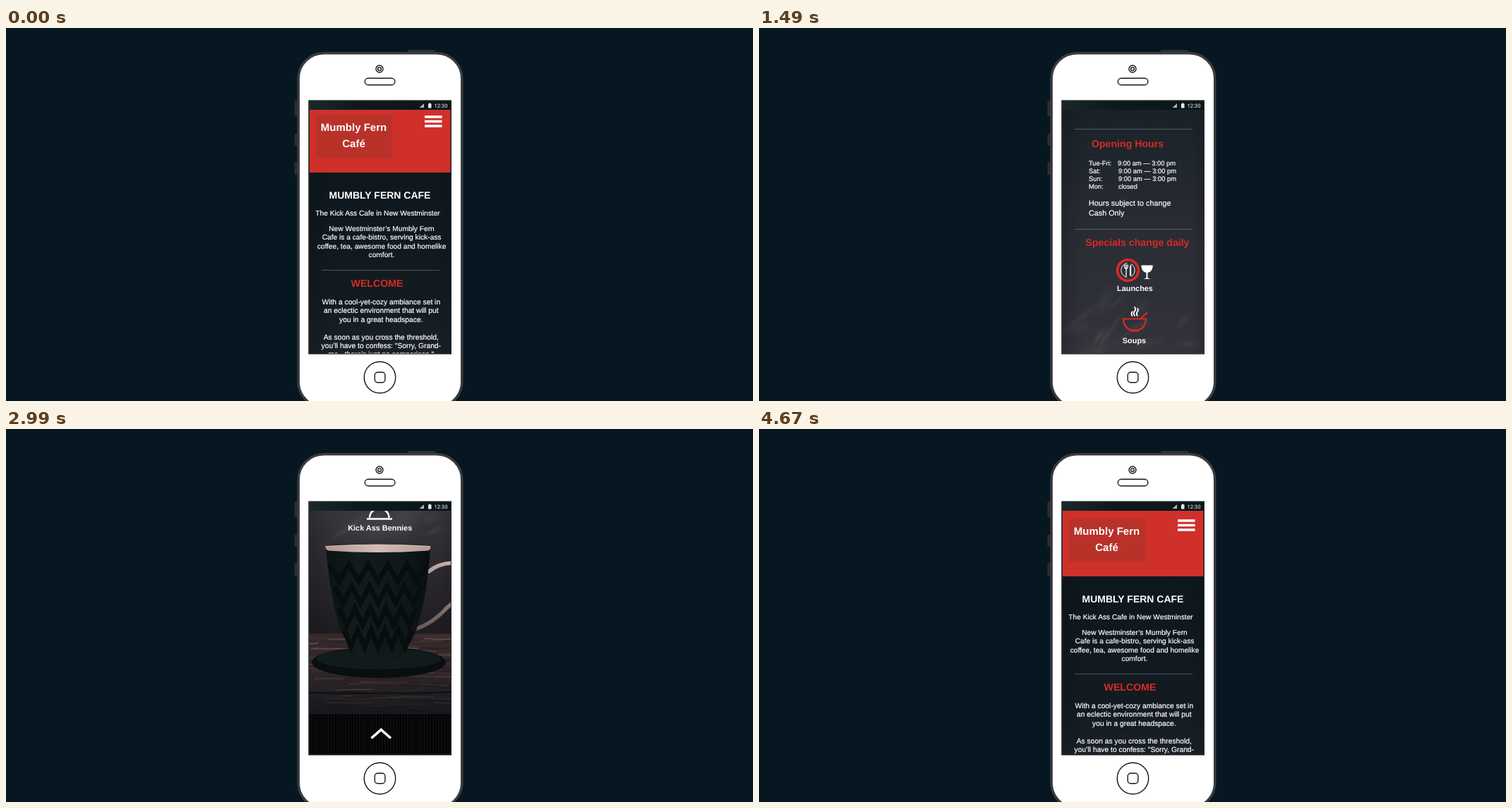
Animation of 1058 by 529 pixels, one loop 4700 ms. Source, as an HTML page:

```html
<!DOCTYPE html>
<html lang="en">
<head>
<meta charset="utf-8">
<title>Cafe mobile page</title>
<style>
  html, body { margin: 0; width: 100%; height: 100%; overflow: hidden; background: #071721; }
  svg { display: block; width: 100vw; height: 100vh; }
  text {
    font-family: "Liberation Sans", Arial, sans-serif;
    font-size: 10.2px; fill: #fff; stroke: #fff; stroke-width: .2px;
    text-rendering: geometricPrecision; white-space: pre;
  }
  .mid text { text-anchor: middle; }
  .title { font-size: 14px; font-weight: bold; stroke: none; }
  .red { font-size: 14.15px; font-weight: bold; fill: #d62b24; stroke: none; }
  .dish text, text.dish { font-size: 10.9px; font-weight: bold; text-anchor: middle; stroke: none; }
  .body text { font-size: 10.3px; }
  .hours text { font-size: 9.35px; }
  .note text { font-size: 10.8px; }
  .foot text { font-size: 9.65px; }
  .menu text { font-size: 9.2px; }
  .logo text { font-size: 15px; font-weight: bold; stroke: none; }
  .rule { stroke: #aab4ba; stroke-opacity: .38; }
  .line { fill: none; stroke: #fff; stroke-width: 1.3; stroke-linecap: round; stroke-linejoin: round; }
  .ink { fill: none; stroke: #15171a; stroke-width: 1.4; }
</style>
</head>
<body>
<svg viewBox="0 0 1058 529" preserveAspectRatio="none">
  <defs>
    <clipPath id="view"><rect x="429.5" y="116" width="200.5" height="345.5"/></clipPath>
    <linearGradient id="board" gradientUnits="userSpaceOnUse" x1="0" y1="100" x2="0" y2="1200">
      <stop offset="0" stop-color="#0b151b"/>
      <stop offset=".26" stop-color="#131b21"/>
      <stop offset=".4" stop-color="#20262d"/>
      <stop offset=".52" stop-color="#2c2e35"/>
      <stop offset=".68" stop-color="#34343b"/>
      <stop offset=".84" stop-color="#353439"/>
      <stop offset=".93" stop-color="#29272c"/>
      <stop offset="1" stop-color="#1d1b20"/>
    </linearGradient>
    <linearGradient id="edge">
      <stop offset="0" stop-color="#05090d" stop-opacity=".2"/>
      <stop offset=".16" stop-color="#05090d" stop-opacity="0"/>
      <stop offset=".9" stop-color="#05090d" stop-opacity="0"/>
      <stop offset="1" stop-color="#05090d" stop-opacity=".15"/>
    </linearGradient>
    <radialGradient id="haze">
      <stop offset="0" stop-color="#a8a4a8" stop-opacity=".14"/>
      <stop offset="1" stop-color="#a8a4a8" stop-opacity="0"/>
    </radialGradient>
    <linearGradient id="china">
      <stop offset="0" stop-color="#0b1314"/>
      <stop offset=".3" stop-color="#111c1d"/>
      <stop offset=".75" stop-color="#0f1819"/>
      <stop offset="1" stop-color="#090f10"/>
    </linearGradient>
    <linearGradient id="rim">
      <stop offset="0" stop-color="#b3968f"/>
      <stop offset=".5" stop-color="#d4beb6"/>
      <stop offset="1" stop-color="#b39993"/>
    </linearGradient>
    <linearGradient id="grip" gradientUnits="userSpaceOnUse" x1="0" y1="385" x2="0" y2="480">
      <stop offset="0" stop-color="#cbb5ae"/>
      <stop offset=".3" stop-color="#a8938e"/>
      <stop offset="1" stop-color="#6b5b59"/>
    </linearGradient>
    <linearGradient id="dusk" x2="0" y2="1">
      <stop offset=".4" stop-color="#10161a" stop-opacity="0"/>
      <stop offset="1" stop-color="#10161a" stop-opacity=".85"/>
    </linearGradient>
    <linearGradient id="status">
      <stop offset="0" stop-color="#1b282a"/>
      <stop offset=".35" stop-color="#0d191d"/>
      <stop offset="1" stop-color="#0b161a"/>
    </linearGradient>
    <pattern id="pin" width="4" height="4" patternUnits="userSpaceOnUse">
      <rect width="4" height="4" fill="#040404"/>
      <rect width="1.4" height="4" fill="#110f0f"/>
    </pattern>
  </defs>

  <rect width="1058" height="529" fill="#071721"/>

  <!-- phone -->
  <g fill="#2b2d30">
    <rect x="408.5" y="103" width="6" height="22" rx="1"/>
    <rect x="408.5" y="150" width="6" height="17" rx="1"/>
    <rect x="408.5" y="190" width="6" height="18" rx="1"/>
    <rect x="569" y="31" width="39" height="6" rx="1"/>
  </g>
  <rect x="414.2" y="35.7" width="231.5" height="502" rx="36" fill="#fff" stroke="#3a3b3e" stroke-width="3.5"/>
  <g class="ink">
    <circle cx="529" cy="58" r="5"/>
    <circle cx="529" cy="58" r="2.4"/>
    <rect x="508.3" y="71.3" width="42.6" height="9.4" rx="4.7"/>
    <circle cx="529.5" cy="495.5" r="22.2"/>
    <rect x="522.3" y="488.3" width="14.6" height="14.4" rx="4"/>
  </g>
  <rect x="428.5" y="102.5" width="202.5" height="360" fill="#1c2429"/>

  <g clip-path="url(#view)">
    <g id="page">
      <rect x="429" y="0" width="202" height="1310" fill="url(#board)"/>
      <g id="smoke" fill="url(#haze)">
        <ellipse cx="575" cy="915" rx="100" ry="95"/>
        <ellipse cx="480" cy="860" rx="70" ry="90" opacity=".5"/>
        <ellipse cx="575" cy="1005" rx="30" ry="62" transform="rotate(24 575 1005)"/>
        <ellipse cx="525" cy="1045" rx="70" ry="34"/>
      </g>
      <rect x="429" y="205" width="202" height="1103" fill="url(#edge)"/>

      <!-- header -->
      <rect x="430" y="0" width="199.5" height="205" fill="#cf302a"/>
      <rect x="438.5" y="123.5" width="108" height="61" fill="#b8322a"/>
      <g class="mid logo">
        <text x="492.5" y="146">Mumbly Fern</text>
        <text x="492.5" y="169">Café</text>
      </g>
      <path d="M593 126h24.5M593 132.5h24.5M593 139h24.5" stroke="#fff" stroke-width="3.5"/>

      <g class="mid">
        <text class="title" x="529.5" y="242">MUMBLY FERN CAFE</text>
        <text x="526.5" y="266">The Kick Ass Cafe in New Westminster</text>
        <text x="532" y="288.2">New Westminster’s Mumbly Fern</text>
        <text x="532" y="300.3">Cafe is a cafe-bistro, serving kick-ass</text>
        <text x="532" y="312.5">coffee, tea, awesome food and homelike</text>
        <text x="532" y="324.7">comfort.</text>
        <text class="red" x="525.5" y="366.7">WELCOME</text>
      </g>
      <path class="rule" d="M447 343.5H614M447 497.5H614M447 639.5H614M447 982.5H614"/>
      <g class="mid body">
        <text x="531.3" y="392">With a cool-yet-cozy ambiance set in</text>
        <text x="531.3" y="404.3">an eclectic environment that will put</text>
        <text x="531.3" y="416.6">you in a great headspace.</text>
        <text x="531.3" y="441.6">As soon as you cross the threshold,</text>
        <text x="531.3" y="454">you’ll have to confess: "Sorry, Grand-</text>
        <text x="531.3" y="466.4">ma - there’s just no comparison."</text>
      </g>
      <g class="mid">
        <text class="red" x="522" y="522.5">Opening Hours</text>
        <text class="red" x="536" y="662.5">Specials change daily</text>
        <text class="red" x="534.5" y="1000.2">Saturday &amp; Sunday</text>
      </g>
      <g class="hours">
        <text x="467" y="548.5">Tue-Fri:</text><text x="508" y="548.5">9:00 am — 3:00 pm</text>
        <text x="467" y="559.8">Sat:</text><text x="509" y="559.8">9:00 am — 3:00 pm</text>
        <text x="467" y="571">Sun:</text><text x="509" y="571">9:00 am — 3:00 pm</text>
        <text x="467" y="582.3">Mon:</text><text x="509" y="582.3">closed</text>
      </g>
      <g class="note">
        <text x="467" y="606">Hours subject to change</text>
        <text x="467" y="619.5">Cash Only</text>
      </g>

      <!-- dishes -->
      <g class="dish" transform="translate(0 521)">
        <circle cx="522.5" cy="176.5" r="14.8" fill="none" stroke="#d62b24" stroke-width="3.6"/>
        <path class="line" style="stroke-width:1" d="M521 166.5a10.2 10.2 0 0 0 0 20M527.5 167.8a10.2 10.2 0 0 1 0 17.4"/>
        <path class="line" d="M517.8 169v4q2.2 3.500 4.400 0v-4M520 169v15.500"/>
        <path d="M525 184.500v-12q0-3 2.200-4.500v16.500z" fill="#fff"/>
        <path d="M541.300 169.500h16.600q-.5 9.500-7.400 10.500v7.500l4 1.500h-10l4-1.500v-7.500q-6.700-1-7.200-10.500z" fill="#fff"/>
        <text x="532.5" y="206">Launches</text>

        <path class="line" style="stroke-width:1.8" d="M528.500 241q-2-3 0-5.500M532 241q-2.500-4 0-6.500t0-5.500M535.800 241q-2-3 0-5.500t.5-4.500"/>
        <path fill="none" stroke="#d62b24" stroke-width="2.2" stroke-linejoin="round" d="M514.500 245.500h34.500M516 246q1 13.500 12 15.500h8q11-2 12-15.500M525.500 262.500h12.500M540.500 245l9.500-8.500"/>
        <text x="531.5" y="280">Soups</text>

        <path fill="#d62b24" d="M518 314.500l3.500-1 .5 1h3l4-2 1.500 9-5 .3-1 1-6-1.300zM538 311h4l1.500 4-1 9h-3z"/>
        <g fill="#fff">
          <path id="strip" d="M526.300 310h4.400l3.600 16h-4.400z"/>
          <use href="#strip" x="5.4"/>
          <path d="M537.300 310h4l2.600 16h-4z"/>
          <path d="M537.500 328.500l5-.8-1.800 6.300h-3z"/>
        </g>
        <path d="M532 312l2.800 13M537 312l2.800 13" stroke="#d62b24" stroke-width=".8"/>
        <text x="531.5" y="347.5">Casseroles</text>
        <text x="531.5" y="360.5">Pastas</text>

        <path class="line" d="M508.500 395.500h8M508.500 399h9M508.500 402.500h8M516.500 395.500q5-1 8 2M516.500 402.500q4 3.500 9.500 0M527 398q-2-8 12.500-10.500 1.500 7-3.500 11M526.500 398.500q-2 8 5.500 10 6 1.500 10.500 1.500 1-5-1.500-10.500-3-7.500-7-5.500t-7.500 4.500M529 400l12 8.500M528 397.500l9-7M534 397v6l-4 1.500M538 400v6"/>
        <text x="531.5" y="423">Vegetarian</text>
        <text x="531.5" y="436">Dishes</text>
      </g>
      <g transform="translate(0 703)">
        <path class="line" style="stroke-width:2.4" d="M515 327q1.500-11.500 13.800-12 12.200.5 13.700 12M526.800 313.500a2.300 2.300 0 1 1 4 0"/>
        <path d="M511 329.500h36" stroke="#fff" stroke-width="2.6"/>
        <text class="dish" x="529.7" y="346">Kick Ass Bennies</text>

        <!-- table, saucer and cup -->
        <rect x="429" y="492" width="202" height="113" fill="#33282a"/>
        <g id="wood" fill="none"></g>
        <rect x="429" y="492" width="202" height="113" fill="url(#dusk)"/>
        <ellipse cx="528" cy="533" rx="95" ry="22" fill="#090e10"/>
        <ellipse cx="528" cy="528" rx="88" ry="15" fill="#111b1c"/>
        <path fill="none" stroke="url(#grip)" stroke-width="5.5" stroke-linejoin="round" d="M592 386q-1 19 7 18 13-11 32-12 22 6 15 34-6 18-22 30-20 22-45 30"/>
        <path fill="url(#china)" d="M453 371q5 57 15 96 10 40 34 62h52q24-22 33-62 10-39 14-96z"/>
        <g id="zigzag" fill="none" stroke="#080d0e" stroke-width="7"></g>
        <path d="M452.500 368.500q74-5 148.500 0 1 5-3 6-71 5-142 0-3.500-2-3.500-6z" fill="url(#rim)"/>
        <path d="M452.500 368.500q74-5 148.500 0" fill="none" stroke="#efe0d9" stroke-width=".8"/>
      </g>

      <!-- footer -->
      <g transform="translate(0 1128)">
        <rect x="429" y="180" width="202" height="500" fill="url(#pin)"/>
        <path d="M429 180.500h202" stroke="#182023"/>
        <path d="M517.500 215.500L531.200 203.500 545 215.500" fill="none" stroke="#fff" stroke-width="3.6"/>
        <g class="mid foot">
          <text x="528.3" y="257">Adress:</text>
          <text x="528.3" y="270.5">Mumbly Fern Cafe</text>
          <text x="528" y="284">482 Zib Street @ Tolverin</text>
          <text x="528" y="409.5">Mumbly Fern Cafe</text>
          <text x="528" y="423.5">2016 © All Rights Reserved.</text>
        </g>
        <g class="menu">
          <text x="469.3" y="331.7">Home</text>
          <text x="517" y="331.7">Map &amp; Location</text>
          <text x="470" y="350.6">Our menu</text>
          <text x="539.5" y="350.6">Comments</text>
        </g>
        <path d="M505.500 321v15M525.500 340v15" stroke="#3a3a3a"/>
      </g>
    </g>
  </g>

  <!-- status bar -->
  <rect x="429" y="103" width="201.5" height="13" fill="url(#status)"/>
  <path d="M585.500 113l6.500-6v6z" fill="#aeb6b8"/>
  <path d="M598 107.500h1v-1h2.500v1h1v6h-4.500z" fill="#e6eaea"/>
  <text x="606.5" y="112.6" style="font:7.6px Roboto,sans-serif;stroke:none">12:30</text>
  <rect x="429" y="103" width="201.5" height="359" fill="none" stroke="#2b3236"/>
</svg>

<script>
  const LOOP = 4700, TICK = 30;
  const byId = id => document.getElementById(id);

  function add(parent, tag, attrs) {
    const el = document.createElementNS("http://www.w3.org/2000/svg", tag);
    for (const k in attrs) el.setAttribute(k, attrs[k]);
    byId(parent).append(el);
  }

  let seed = 11;
  const rand = () => (seed = seed * 16807 % 2147483647) / 2147483647;

  // zigzag bands, narrowing with the cup
  for (let row = 0; row < 4; row++) {
    const y = 394 + row * 31, half = 69 - row * 7;
    let d = "";
    for (let i = 0; i <= 10; i++)
      d += (i ? "L" : "M") + (527 + half * (i / 5 - 1)) + " " + (y + (i % 2) * 24);
    add("zigzag", "path", { d });
  }

  // wood grain
  const grain = ["#6b4a48", "#171315", "#4f3838", "#241b1e", "#81605b"];
  for (let i = 0; i < 150; i++) {
    const x = 415 + rand() * 200, y = 494 + rand() * 109, len = 15 + rand() * 70;
    add("wood", "path", {
      d: `M${x} ${y}q${len / 2} ${rand() * 4 - 2} ${len} ${rand() * 2 - 1}`,
      stroke: grain[i % grain.length],
      "stroke-width": 0.6 + rand() * 1.6,
      opacity: 0.55
    });
  }
  add("wood", "path", { d: "M429 576q100 3 202-1", stroke: "#0f0d0f", "stroke-width": 2.5 });

  // chalky wisps on the board
  for (let i = 0; i < 40; i++) {
    const cx = 440 + rand() * 185, cy = 740 + rand() * 310;
    add("smoke", "ellipse", {
      cx, cy, rx: 15 + rand() * 35, ry: 3 + rand() * 9, opacity: 0.6,
      transform: `rotate(${-65 + rand() * 60} ${cx} ${cy})`
    });
  }

  // start time, ticks, scroll from, scroll to
  const moves = [
    [330, 25, 0, 225],
    [1220, 23, 225, 521],
    [2450, 30, 521, 1128],
    [4250, 15, 1128, -4]
  ];
  const pose = (time, scroll) => ({
    offset: time / LOOP,
    transform: `translateY(${-Math.round(scroll)}px)`,
    easing: "step-end"
  });
  const poses = [pose(0, 0)];
  for (const [start, n, from, to] of moves)
    for (let i = 1; i <= n; i++)
      poses.push(pose(start + (i - 1) * TICK - 1, from + (to - from) * i / n));
  poses.push(pose(LOOP, -4));
  byId("page").animate(poses, { duration: LOOP, iterations: Infinity });
</script>
</body>
</html>
```
